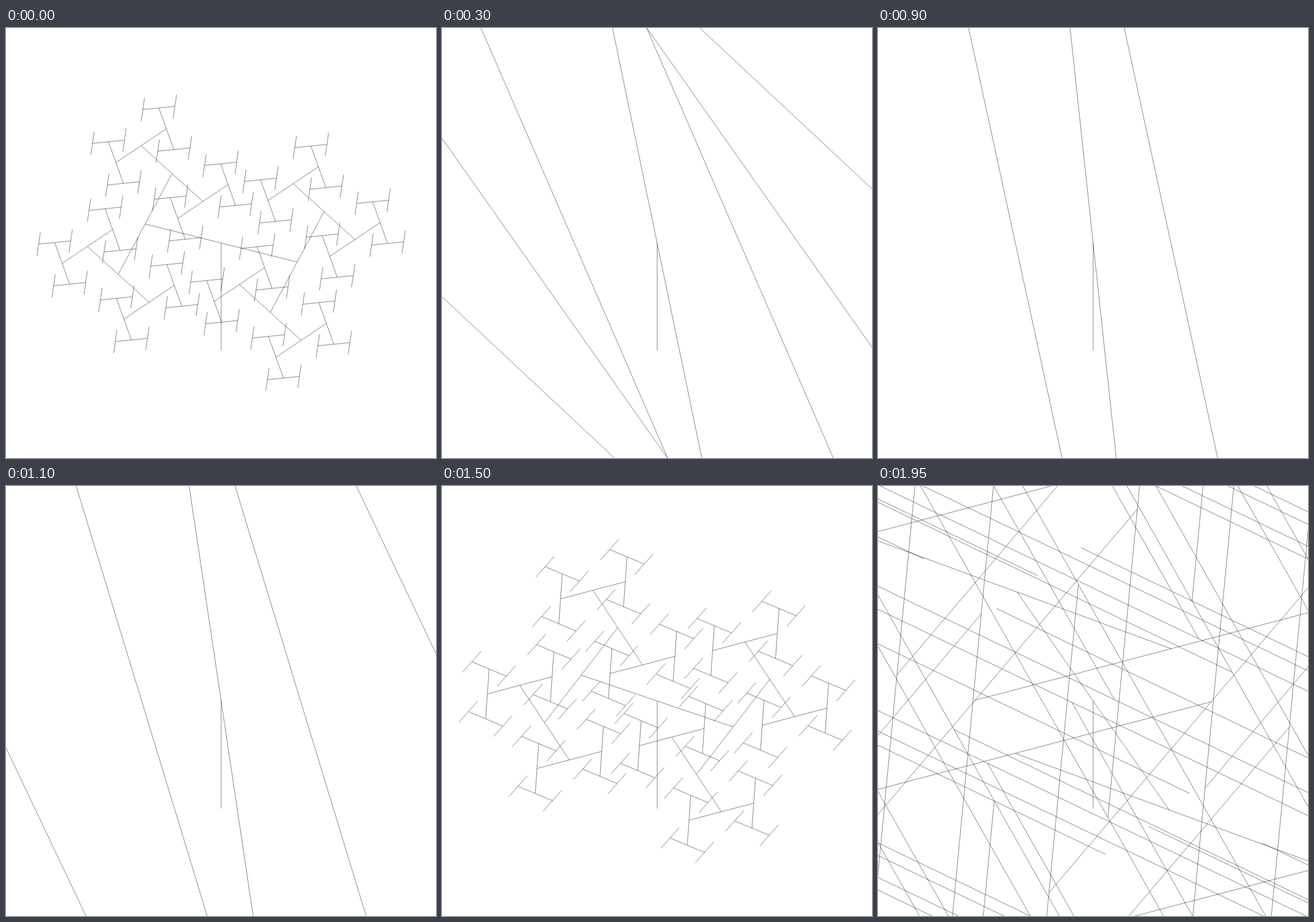
Write an HTML page that moves like this. It is 748 by 748 pixels and loops after 2000 ms.

```html
<!DOCTYPE html>
<html lang="en">
<head>
<meta charset="utf-8">
<title>Skewed H-tree</title>
<style>
  html, body { margin: 0; width: 100%; height: 100%; overflow: hidden; background: #fff; }
  svg { display: block; width: 100vw; height: 100vh; }
  path { fill: none; stroke: #000; stroke-width: 0.5; }
</style>
</head>
<body>
<svg viewBox="0 0 748 748"><path id="tree"/></svg>
<script>
const SIZE = 748, CENTER_X = 374.25, CENTER_Y = 374, TRUNK = 187, DEPTH = 7;
const STEP = 50, LOOP = 2000;
const tree = document.getElementById('tree');

// Sideways lean of each branch, relative to its perpendicular part.
const leanAt = step => 4.6607 + 5.2819 * Math.sin(0.169588 * step - 0.9882);

// Segment from (x - dx, y - dy) to (x + dx, y + dy), cut to the stage.
function segment(x, y, dx, dy) {
  let from = -1, to = 1;
  for (const [pos, dir] of [[x, dx], [y, dy]]) {
    if (Math.abs(dir) < 1e-9) {
      if (pos < 0 || pos > SIZE) return '';
      continue;
    }
    const a = (-10 - pos) / dir, b = (SIZE + 10 - pos) / dir;
    from = Math.max(from, Math.min(a, b));
    to = Math.min(to, Math.max(a, b));
  }
  if (from >= to) return '';
  const point = k => (x + k * dx).toFixed(3) + ' ' + (y + k * dy).toFixed(3);
  return 'M' + point(from) + 'L' + point(to);
}

// Every branch is the previous one turned a quarter, leaned and scaled.
function branch(x, y, vx, vy, lean, depth) {
  if (!depth) return '';
  const dx = (-vy - lean * vx) * Math.SQRT1_2;
  const dy = (vx - lean * vy) * Math.SQRT1_2;
  return segment(x, y, dx, dy)
    + branch(x + dx, y + dy, dx, dy, lean, depth - 1)
    + branch(x - dx, y - dy, dx, dy, lean, depth - 1);
}

function render(time) {
  const lean = leanAt(Math.floor((time % LOOP) / STEP));
  tree.setAttribute('d', `M${CENTER_X} ${CENTER_Y + TRUNK}v${-TRUNK}`
    + branch(CENTER_X, CENTER_Y, 0, -TRUNK, lean, DEPTH));
}

let start;
function tick(now) {
  start ??= now;
  render(now - start);
  requestAnimationFrame(tick);
}
render(0);
requestAnimationFrame(tick);
</script>
</body>
</html>
```
